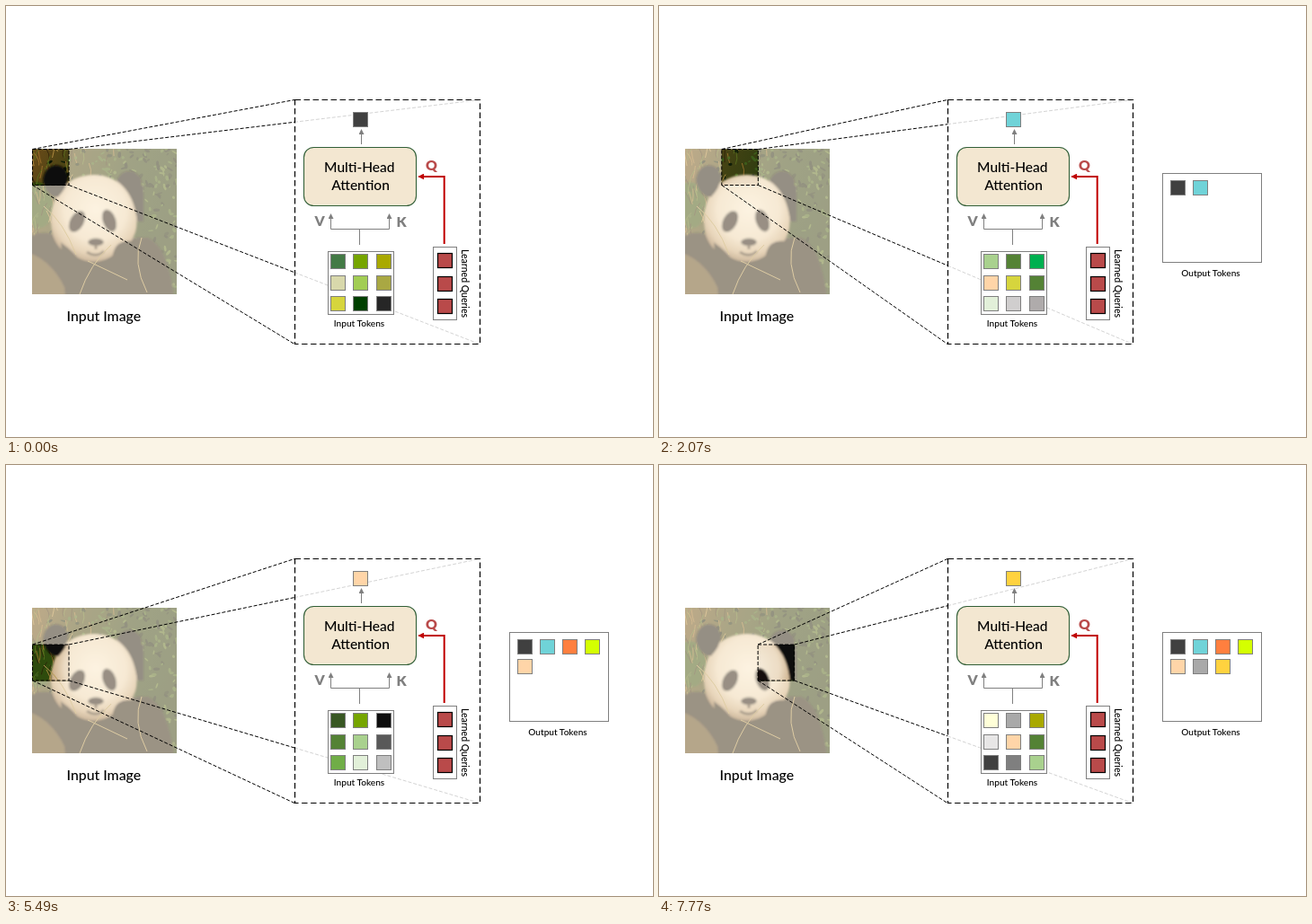
An HTML page for the animation above (8 s loop, 720 by 480 pixels).

```html
<!DOCTYPE html>
<html lang="en">
<head>
<meta charset="utf-8">
<title>Patch attention</title>
<style>
  html, body { margin: 0; width: 100%; height: 100%; overflow: hidden; background: #fff; }
  svg { display: block; width: 100%; height: 100%; }
  text { font-family: Lato, "Open Sans", sans-serif; text-anchor: middle; fill: #000; }
  .big { font-size: 15.5px; font-weight: 500; }
  .small { font-size: 10.1px; font-weight: 500; }
  .key { font-size: 15.8px; font-weight: 900; fill: #7f7f7f; }
  .frame { fill: #fff; stroke: #7f7f7f; }
  .wire { fill: none; stroke: #7f7f7f; }
  .token { stroke: #7f7f7f; }
  .zoom { fill: none; stroke: #000; stroke-dasharray: 4 2; }
  .faint { stroke: #d4d4d4; }
</style>
</head>
<body>
<svg viewBox="0 0 720 480">
  <defs>
    <clipPath id="photoArea"><rect x="29" y="159" width="161" height="162"/></clipPath>
    <clipPath id="patchArea"><rect id="patchClip" width="40.5" height="40.5"/></clipPath>
    <linearGradient id="meadow" x2="1" y2=".35">
      <stop offset="0" stop-color="#6b4a18"/>
      <stop offset=".3" stop-color="#414213"/>
      <stop offset=".65" stop-color="#263a0f"/>
      <stop offset="1" stop-color="#1f330e"/>
    </linearGradient>
    <radialGradient id="fur" cx=".52" cy=".4" r=".6">
      <stop offset="0" stop-color="#faf1e2"/>
      <stop offset=".6" stop-color="#ecdcc4"/>
      <stop offset=".85" stop-color="#cbae89"/>
      <stop offset="1" stop-color="#8f6d48"/>
    </radialGradient>
    <filter id="soft"><feGaussianBlur stdDeviation="1.3"/></filter>
    <g id="photo" clip-path="url(#photoArea)">
      <rect x="29" y="159" width="161" height="162" fill="url(#meadow)"/>
      <ellipse cx="34" cy="222" rx="20" ry="26" fill="#2f4c10" filter="url(#soft)"/>
      <g id="plants"></g>
      <g filter="url(#soft)">
        <path d="M25 258Q44 246 62 260L158 258Q180 268 187 325H25Z" fill="#1c140d"/>
        <path d="M25 275Q55 285 70 325H25Z" fill="#57431f"/>
        <circle cx="137" cy="198" r="14" fill="#0d0907"/>
        <path d="M126 200H153V240H140Z" fill="#0d0907"/>
        <path d="M50 238C51 207 70 188 98 188C124 188 141 207 145 235C148 257 136 268 121 276Q101 291 80 280C60 276 50 260 50 238Z" fill="url(#fur)"/>
        <path d="M41 195C43 172 67 172 69 192Q68 203 58 213Q45 212 41 195Z" fill="#0d0907"/>
        <ellipse cx="79" cy="240" rx="8" ry="13" fill="#120d0a" transform="rotate(28 79 240)"/>
        <ellipse cx="115" cy="239" rx="7.5" ry="13" fill="#120d0a" transform="rotate(-20 115 239)"/>
        <ellipse cx="100" cy="263" rx="9" ry="4.5" fill="#18110d"/>
        <path d="M100 266V271M90 274Q100 281 109 273" fill="none" stroke="#382719" stroke-width="3"/>
        <path d="M119 275Q123 259 142 262Q166 270 170 325H108Z" fill="#1c140d"/>
        <path d="M61 263Q77 274 84 286L108 291L107 325H66Z" fill="#1c140d"/>
      </g>
      <path d="M82 321Q93 288 117 266M42 223Q64 240 78 277M91 284L135 305M151 258Q140 286 157 319" fill="none" stroke="#b59a55"/>
    </g>
    <marker id="greyTip" viewBox="0 0 6 6" refX="5" refY="3" markerWidth="6" markerHeight="6" markerUnits="userSpaceOnUse" orient="auto-start-reverse">
      <path d="M0 0L6 3L0 6Z" fill="#7f7f7f"/>
    </marker>
    <marker id="redTip" viewBox="0 0 6 6" refX="5" refY="3" markerWidth="7" markerHeight="7" markerUnits="userSpaceOnUse" orient="auto">
      <path d="M0 0L6 3L0 6Z" fill="#c00000"/>
    </marker>
  </defs>

  <use href="#photo"/>
  <rect x="29" y="159" width="161" height="162" fill="#fff4e1" opacity=".56"/>
  <g clip-path="url(#patchArea)"><use href="#photo"/></g>
  <text class="big" x="108.8" y="351" style="font-size:15.8px">Input Image</text>

  <path id="faintLines" class="zoom faint"/>
  <path id="darkLines" class="zoom"/>
  <rect x="321.5" y="104.5" width="206" height="272" fill="none" stroke="#000" stroke-width="1.2" stroke-dasharray="6.5 3.5"/>

  <path class="wire" d="M395.5 154V138" marker-end="url(#greyTip)"/>
  <rect x="331.5" y="157.5" width="125" height="65" rx="11" fill="#f3e7d1" stroke="#315f37" stroke-width="1.1"/>
  <text class="big" x="393.3" y="185">Multi-Head</text>
  <text class="big" x="394.5" y="205">Attention</text>

  <path class="wire" d="M361.5 232V248.5H426.5V232" marker-start="url(#greyTip)" marker-end="url(#greyTip)"/>
  <path class="wire" d="M393.5 248.5V266"/>
  <text class="key" x="349" y="244.5">V</text>
  <text class="key" x="440" y="245.5">K</text>

  <rect class="frame" x="358.5" y="273.5" width="73" height="70"/>
  <text class="small" x="393" y="357">Input Tokens</text>

  <path d="M487.7 265V190H459.5" fill="none" stroke="#c00000" stroke-width="2" marker-end="url(#redTip)"/>
  <text class="key" x="473.5" y="183" style="fill:#b94a4a">Q</text>
  <rect class="frame" x="475.5" y="268.5" width="26" height="81"/>
  <g id="queries"></g>
  <text class="small" transform="translate(507 309) rotate(90)" style="font-size:10.5px">Learned Queries</text>

  <g id="inputs"></g>
  <g id="result"></g>
  <g id="outputPanel">
    <rect class="frame" x="560.5" y="186.5" width="110" height="99"/>
    <text class="small" x="614" y="301">Output Tokens</text>
    <g id="outputs"></g>
  </g>
</svg>
<script>
const LOOP = 8000, PANEL_AT = 1070;

// start time, output colour, nine input colours
const steps = [
  [0, '404040', '437a45 76a500 a9a900 d8d8ab a2cd54 a9a843 d6d53d 004000 262626'],
  [2070, '70d3d8', 'a9d18e 548235 00b050 ffd5a8 d6d53d 548235 e2f0d9 d0cece afabab'],
  [3210, 'ff7f3f', '437a45 76a500 a9a900 a9d18e 548235 a9a843 a6a6a6 385723 262626'],
  [4350, 'd4ff00', '385723 548235 70ad47 3ca87c 70ad47 a9a843 00d679 007600 437a45'],
  [5490, 'ffd5a8', '385723 76a500 0d0d0d 548235 a9d18e 595959 70ad47 e2f0d9 bfbfbf'],
  [6630, 'a9a9a9', 'e7e6e6 ffffd8 e7e6e6 ffd5a8 e7e6e6 d0cece 404040 7f7f7f afabab'],
  [7770, 'ffd23f', 'ffffd8 a9a9a9 a9a900 e7e6e6 ffd5a8 548235 404040 7f7f7f a9d18e']
].map(([at, output, inputs]) => ({ at, output, inputs: inputs.split(' ') }));

const $ = id => document.getElementById(id);

function add(parent, tag, attrs) {
  const node = document.createElementNS('http://www.w3.org/2000/svg', tag);
  for (const name in attrs) node.setAttribute(name, attrs[name]);
  return parent.appendChild(node);
}

const square = (parent, x, y, color) =>
  add(parent, 'rect', { class: 'token', x: x + .5, y: y + .5, width: 16, height: 16, fill: '#' + color });

let seed = 19;
const random = () => (seed = seed * 16807 % 2147483647) / 2147483647;

function growPlants() {
  const grass = ['#a8782f', '#c29a48', '#2b1c08', '#5c7420'];
  const leaves = ['#101d07', '#3c5c1a', '#0b1606', '#4d6a22'];
  for (let i = 0; i < 420; i++) {
    const x = 27 + random() * 164, y = 157 + random() * 165;
    const shade = Math.floor(random() * 4);
    if (random() > (x - 29) / 110) {
      add($('plants'), 'path', {
        d: `M${x} ${y}q${random() * 6 - 3} -6 ${random() * 14 - 7} -14`,
        fill: 'none', stroke: grass[shade], 'stroke-width': .8
      });
    } else {
      add($('plants'), 'ellipse', {
        cx: x, cy: y, rx: 1.5 + random() * 2.5, ry: .8 + random() * 1.2,
        fill: leaves[shade], transform: `rotate(${random() * 180} ${x} ${y})`
      });
    }
  }
}

growPlants();
[275, 301, 326].forEach(y =>
  square($('queries'), 480, y, 'b94a4a').setAttribute('style', 'stroke:#000;stroke-width:1.2'));

const columns = [361, 386, 412], rows = [276, 300, 323];
const inputTokens = steps[0].inputs.map((color, i) =>
  square($('inputs'), columns[i % 3], rows[Math.floor(i / 3)], color));
const outputTokens = steps.map(({ output }, i) =>
  square($('outputs'), [569, 594, 619, 644][i % 4], 194 + 22 * Math.floor(i / 4), output));
const resultToken = square($('result'), 386, 118, steps[0].output);

function show(index) {
  const { output, inputs } = steps[index];
  const left = 29.5 + 40.3 * (index % 4), top = 159.5 + 40.5 * Math.floor(index / 4);
  const right = left + 40.5, bottom = top + 40;
  const cut = (321 - right) / (527 - right);
  const upper = top + (104.5 - top) * cut, lower = bottom + (376.5 - bottom) * cut;

  $('patchClip').setAttribute('x', left);
  $('patchClip').setAttribute('y', top);
  $('darkLines').setAttribute('d',
    `M${left} ${top}H${right}V${bottom}H${left}Z` +
    `M${left} ${top}L321 104.5M${left} ${bottom}L321 376.5` +
    `M${right} ${top}L321 ${upper}M${right} ${bottom}L321 ${lower}`);
  $('faintLines').setAttribute('d', `M321 ${upper}L527 104.5M321 ${lower}L527 376.5`);
  inputTokens.forEach((node, i) => node.setAttribute('fill', '#' + inputs[i]));
  outputTokens.forEach((node, i) => node.setAttribute('visibility', i <= index ? 'inherit' : 'hidden'));
  resultToken.setAttribute('fill', '#' + output);
}

let current = -1;
function render(time) {
  const index = steps.filter(step => step.at <= time).length - 1;
  if (index !== current) show(current = index);
  $('outputPanel').setAttribute('visibility', time >= PANEL_AT ? 'visible' : 'hidden');
}

const start = performance.now();
function tick() {
  render((performance.now() - start) % LOOP);
  requestAnimationFrame(tick);
}
tick();
</script>
</body>
</html>
```
